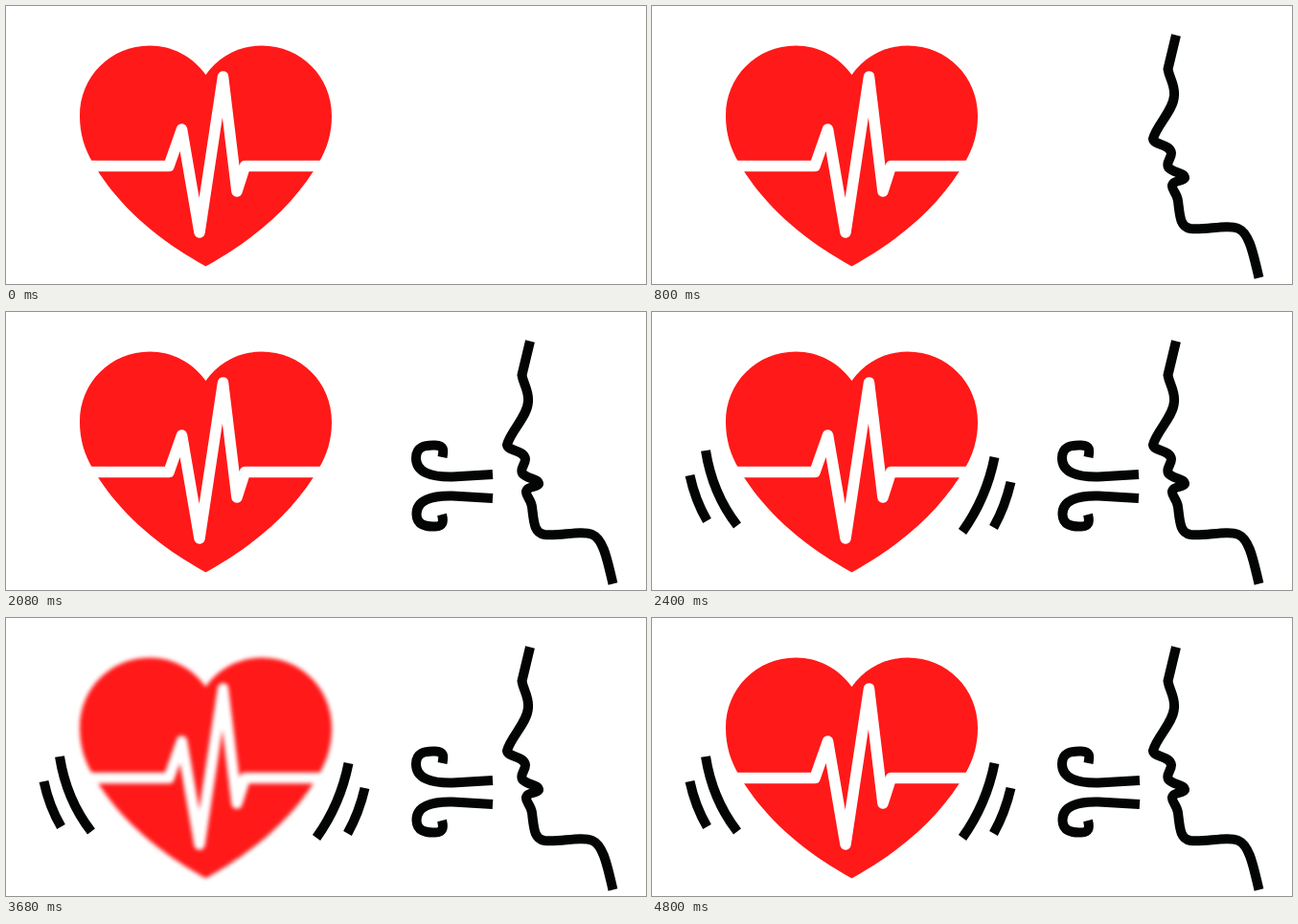
Animation of 668x291 px, one loop 5600 ms. Source, as an HTML page:

```html
<!DOCTYPE html>
<html lang="en">
<head>
<meta charset="utf-8">
<title>Heartbeat and breath</title>
<style>
  html, body { margin: 0; width: 100%; height: 100%; overflow: hidden; background: #fff; }
  svg { display: block; width: 100vw; height: 100vh; }
  .ink { fill: none; stroke: #030404; stroke-width: 10; stroke-linejoin: round; }
</style>
</head>
<body>
<svg viewBox="0 0 668 291">
  <defs>
    <filter id="blur" filterUnits="userSpaceOnUse" x="40" y="10" width="340" height="281" color-interpolation-filters="sRGB">
      <feGaussianBlur id="soft" stdDeviation="2"/>
    </filter>
    <clipPath id="crop"><rect x="72" y="34" width="276" height="246"/></clipPath>
  </defs>

  <g clip-path="url(#crop)">
    <g id="heart">
      <path fill="#ff1919" d="M208.500 72C195 53 174 41.500 150 41.500C109 41.500 77 74 77 115C77 134 82 149 90 163C113 203 150 240 208.500 272.500C267 240 304 203 327 163C335 149 340 134 340 115C340 74 308 41.500 267 41.500C243 41.500 222 53 208.500 72Z"/>
      <path fill="none" stroke="#fff" stroke-width="11.500" stroke-linejoin="round" d="M70 167.500H170L183.500 129L202 237L226.500 74L241 194L249.500 167.500H350"/>
    </g>
  </g>

  <g class="ink">
    <path id="face" d="M547 30.500L538.500 66C540 76 546 82 545 94C544 110 527 124 523 139C524 146 541 144 542 154C542 160 536 164 539 169C544 175 556 174 556 180C554 184 544 182 543 188C542 192 548 196 549 204C551 220 551 231 562 233C578 235 600 228 612 233C624 238 628 262 633.500 284.500"/>
    <g id="wind">
      <path id="gustA"/>
      <path id="gustB"/>
    </g>
    <g id="shake">
      <path d="M56 145Q63 190 89 223.500"/>
      <path d="M39.500 171Q45 197 57.500 218.500"/>
      <path d="M357.500 152Q349 195 324 230"/>
      <path d="M374.500 178Q368.500 204 356.500 225.500"/>
    </g>
  </g>
</svg>
<script>
const STEP = 800, LOOP = 7 * STEP;
const BLUR = [0, 0, 0, 0, 2, 4, 0];
const el = id => document.getElementById(id);
const show = (id, on) => el(id).setAttribute("visibility", on ? "visible" : "hidden");
let last = -1;

function draw(time) {
  const step = Math.floor((time % LOOP) / STEP);
  if (step === last) return;
  last = step;
  show("face", step >= 1);
  show("wind", step >= 2);
  show("shake", step >= 3);

  const tip = step >= 5 ? 509 : 508;
  el("gustA").setAttribute("d", `M${tip} 170L466 172.500C444 173 428 168 428 153C428 141 437 139 448 139.500C457 140 457 144 455.500 152`);
  el("gustB").setAttribute("d", `M${tip} 195L466 192.500C444 192 428 197 428.500 212C429 223 438 225 448 224.500C456 224 457 220 455 212`);

  const blur = BLUR[step];
  if (blur) {
    el("soft").setAttribute("stdDeviation", blur);
    el("heart").setAttribute("filter", "url(#blur)");
  } else {
    el("heart").removeAttribute("filter");
  }
}

const start = performance.now();
function tick() {
  draw(performance.now() - start);
  requestAnimationFrame(tick);
}
tick();
</script>
</body>
</html>
```
